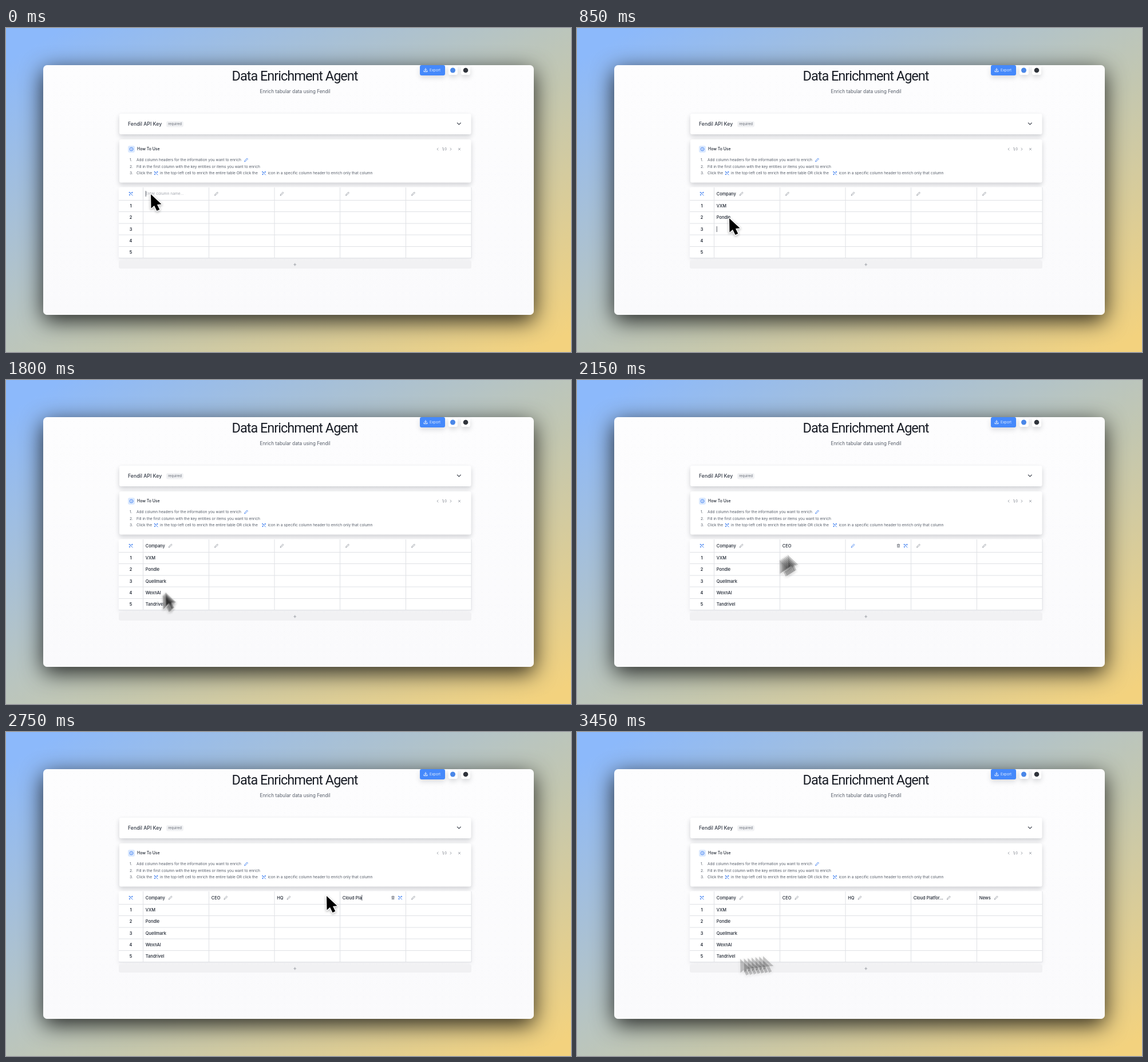
Recreate the animation shown at these times as an HTML page with a canvas. Size 987 by 567 pixels, loop 3.5 s.

```html
<!DOCTYPE html>
<html lang="en">
<head>
<meta charset="utf-8">
<title>Data Enrichment Agent</title>
<style>
html, body { margin: 0; width: 987px; height: 567px; overflow: hidden; }
body { position: relative; background: linear-gradient(to bottom right, #8cb9fb 5%, #bac5be 48%, #c3c7b0 58%, #f3d27e 97%); }
#page { position: absolute; left: 65px; top: 65px; width: 857px; height: 437px; border-radius: 7px;
  background: linear-gradient(#fdfdfe, #fafafc); box-shadow: 0 10px 38px rgba(0, 0, 0, .82); }
canvas { position: absolute; left: 0; top: 0; }
</style>
</head>
<body>
<div id="page"></div>
<canvas id="stage" width="987" height="567"></canvas>
<script>
const LOOP = 3500, STEP = 50;
const ctx = document.getElementById('stage').getContext('2d');
const BLUE = '#3b7df0', INK = '#1d2430', GREY = '#8d929b', BODY = '#555c68', LINE = '#dfe1e5';

const colX = [239.5, 354.5, 469, 583.5, 698.5];
const rowY = [311.5, 331.8, 352, 372.2, 392.4];
const ruleY = [301.5, 321.5, 342, 362, 382.5, 402.5];

// Column headers: edit opens, typing starts, typing ends, edit closes
const headers = [
  { label: 'Company', open: 0, from: 50, to: 300, close: 350 },
  { label: 'CEO', open: 1850, from: 1950, to: 2100, close: 2200 },
  { label: 'HQ', open: 2200, from: 2250, to: 2350, close: 2400 },
  { label: 'Cloud Platform', short: 'Cloud Platfor...', open: 2400, from: 2500, to: 2900, close: 2950 },
  { label: 'News', open: 2950, from: 3100, to: 3300, close: 3350 }
];
const hovers = [null, null, [2100, 2400], [2400, 2950], [2950, 3350]];

// First-column entries: name, typing starts, typing ends
const entries = [
  ['VXM', 350, 450], ['Pondle', 500, 750], ['Quellmark', 900, 1150],
  ['WexnAI', 1200, 1400], ['Tandrivel', 1450, 1750]
];

// Pointer path: time, x, y
const path = [
  [0, 253, 291], [350, 253, 291], [850, 266, 333], [1350, 264, 365], [1700, 266, 386],
  [1950, 298, 350], [2150, 368, 306], [2300, 440, 288], [2450, 524, 287], [2750, 560, 287],
  [2950, 610, 287], [3050, 645, 287], [3200, 706, 288], [3270, 725, 296], [3400, 335, 391],
  [3450, 285, 397], [3500, 256, 392]
];

function text(s, x, y, size, color = INK, weight = 400, align = 'left') {
  ctx.font = `${weight} ${size}px Inter, sans-serif`;
  ctx.fillStyle = color;
  ctx.textAlign = align;
  ctx.fillText(s, x, y + size * .36);
  return ctx.measureText(s).width;
}

function box(x, y, w, h, r, fill, shadow) {
  ctx.save();
  if (shadow) {
    ctx.shadowColor = `rgba(30, 35, 45, ${shadow})`;
    ctx.shadowBlur = 9;
    ctx.shadowOffsetY = 4;
  }
  ctx.fillStyle = fill;
  ctx.beginPath();
  ctx.roundRect(x, y, w, h, r);
  ctx.fill();
  ctx.restore();
}

function dot(x, y, r, fill) {
  ctx.fillStyle = fill;
  ctx.beginPath();
  ctx.arc(x, y, r, 0, 7);
  ctx.fill();
}

// Strokes an SVG path around (x, y)
function icon(d, x, y, color, width = 1) {
  ctx.save();
  ctx.translate(x, y);
  ctx.strokeStyle = color;
  ctx.lineWidth = width;
  ctx.lineCap = ctx.lineJoin = 'round';
  ctx.stroke(new Path2D(d));
  ctx.restore();
}

const pencil = (x, y, color) => icon('M-2.8 2.8L-2.2 .8L1.6 -2.8L2.9 -1.6L-.9 2.3Z', x, y, color, .8);
const sparkle = (x, y, color = BLUE) =>
  icon('M-1 -1L3 3M-1 -1L.4 -1.4M-2.9 -2.2H-1.9M-2.4 -2.8V-1.7M1.6 -2H3.2M2.4 -2.8V-1.2M-2.8 2H-1.2M-2 1.2V2.8', x, y, color);
const trash = (x, y) => icon('M-2.3 -1.8H2.3M-1 -1.8V-2.8H1V-1.8M-1.8 -1.8V2.8H1.8V-1.8M-.5 0V1.5M.5 0V1.5', x, y, '#737780', .8);

function drawPage() {
  ctx.fillStyle = 'rgba(120, 130, 150, .06)';
  for (let y = 72; y < 498; y += 11.5)
    for (let x = 72; x < 918; x += 11.5) ctx.fillRect(x, y, 1, 1);

  ctx.font = '400 23.5px Roboto, sans-serif';
  ctx.letterSpacing = '-1px';
  ctx.textAlign = 'center';
  ctx.fillStyle = '#191d26';
  ctx.fillText('Data Enrichment Agent', 504.5, 92);
  ctx.letterSpacing = '0px';
  text('Enrich tabular data using Fendil', 505, 111, 8.3, BODY, 400, 'center');

  box(723, 65, 44, 18, 3, '#4589fb', .15);
  icon('M0 -3V1M-1.8 -.7L0 1.1L1.8 -.7M-3 1.2V3H3V1.2', 733, 73.5, '#fff', .9);
  text('Export', 740, 73.5, 6.2, '#e4eeff');
  box(773, 66, 16, 16, 3, '#fff', .16);
  dot(780.5, 74, 4.5, '#4a87e8');
  box(795, 66, 16, 16, 3, '#fff', .16);
  dot(803, 74, 4.3, '#30343b');

  box(198, 150, 614.5, 36, 3, '#fff', .2);
  text('Fendil API Key', 213, 167.5, 8.7, '#343b47', 500);
  box(280, 163, 30, 10.5, 3, '#f1f2f4');
  text('required', 295, 168, 6, '#666b75', 400, 'center');
  icon('M-3 -1.5L0 1.5L3 -1.5', 791.3, 167.5, '#4a4f59', 1.1);

  box(198, 195, 614.5, 75.5, 3, '#fff', .2);
  box(213, 206, 12, 12, 3, '#dbe9fe');
  icon('M3 0A3 3 0 1 1 -3 0A3 3 0 1 1 3 0M0 0V1.3M0 -1.4V-1.3', 219, 212, BLUE, .8);
  text('How To Use', 229, 212, 6.9, INK, 500);
  icon('M1 -2L-1 0L1 2', 754, 212, GREY, .8);
  text('1/3', 765.7, 212, 5.8, '#747983', 400, 'center');
  icon('M-1 -2L1 0L-1 2', 777, 212, GREY, .8);
  icon('M-1.7 -1.7L1.7 1.7M1.7 -1.7L-1.7 1.7', 792, 212, GREY, .8);

  const small = (s, x, y) => text(s, x, y, 6.57, BODY);
  [230.8, 242.4, 254].forEach((y, i) => small(i + 1 + '.', 216, y));
  small('Add column headers for the information you want to enrich', 228, 230.8);
  pencil(419.5, 230.8, BLUE);
  small('Fill in the first column with the key entities or items you want to enrich', 228, 242.4);
  small('Click the', 228, 254);
  sparkle(262, 254);
  small('in the top-left cell to enrich the entire table OR click the', 269, 254);
  sparkle(450.5, 254);
  small('icon in a specific column header to enrich only that column', 457.5, 254);

  box(197, 278.5, 616, 124, 3, '#fff', .07);
  ctx.fillStyle = LINE;
  for (const y of ruleY) ctx.fillRect(197, y - .5, 616, 1);
  for (const x of [...colX, 813]) ctx.fillRect(x - .5, 279, 1, 123.5);
  sparkle(218, 290);
  rowY.forEach((y, i) => text(i + 1, 218, y, 7.2, INK, 600, 'center'));
  box(197, 407, 616, 14, 3, '#f1f1f3');
  icon('M-2 0H2M0 -2V2', 504.7, 414, GREY, .8);
}

function typed(s, from, to, t) {
  const share = Math.min(1, Math.max(0, (t - from) / (to - from)));
  return s.slice(0, Math.round(share * s.length));
}

function caret(x, y, t) {
  if (t % 800 >= 400) return;
  ctx.fillStyle = '#4b505a';
  ctx.fillRect(x, y - 5, .9, 10);
}

function drawHeaders(t) {
  headers.forEach((h, i) => {
    const x = colX[i] + 4.3, y = 290;
    const hover = hovers[i] && t >= hovers[i][0] && t < hovers[i][1];
    if (t < h.open) {
      pencil(colX[i] + 13, y, hover ? BLUE : GREY);
    } else if (t < h.close) {
      const s = typed(h.label, h.from, h.to, t);
      const w = s ? text(s, x, y, 7.4, INK, 500) : 0;
      if (!s) text('Enter column name...', x, y, 6.7, '#a3a7af');
      caret(x + w, y, t);
    } else {
      const w = text(h.short || h.label, x, y, 7.4, INK, 500);
      pencil(x + w + 9.5, y, GREY);
    }
    if (hover) {
      trash(colX[i] + 92.5, y);
      sparkle(colX[i] + 105, y);
    }
  });
}

function drawEntries(t) {
  let opened = 350;
  entries.forEach(([name, from, to], i) => {
    const w = text(typed(name, from, to, t), 243.8, rowY[i], 7.4, INK, 500);
    if (t >= opened && t < to) caret(243.8 + w, rowY[i], t);
    opened = to;
  });
}

function pointerAt(t) {
  t = Math.max(0, t);
  const i = Math.max(1, path.findIndex(p => p[0] >= t));
  const [a, b] = [path[i - 1], path[i]];
  const k = (t - a[0]) / (b[0] - a[0]);
  return [a[1] + (b[1] - a[1]) * k, a[2] + (b[2] - a[2]) * k];
}

const arrow = new Path2D('M0 0L.5 24.5L6 19.8L10.5 29L15.3 26.8L11 18L18.5 17.3Z');

function drawArrow([x, y], alpha) {
  ctx.save();
  ctx.translate(x, y);
  ctx.globalAlpha = alpha;
  ctx.lineJoin = 'round';
  ctx.lineWidth = 2.6;
  ctx.strokeStyle = '#fff';
  ctx.shadowColor = 'rgba(0, 0, 0, .35)';
  ctx.shadowBlur = 4;
  ctx.shadowOffsetY = 1.5;
  ctx.stroke(arrow);
  ctx.shadowColor = 'transparent';
  ctx.fillStyle = '#000';
  ctx.fill(arrow);
  ctx.restore();
}

// Fast moves leave a trail of translucent copies
function drawPointer(t) {
  const now = pointerAt(t), before = pointerAt(t - 40);
  if (Math.hypot(now[0] - before[0], now[1] - before[1]) < 5) return drawArrow(now, 1);
  for (let i = 0; i < 7; i++) drawArrow(pointerAt(t - 40 + i * 40 / 6), .2);
}

let shown = -1;
function frame(now) {
  const t = Math.floor(now % LOOP / STEP) * STEP;
  if (t !== shown) {
    shown = t;
    ctx.clearRect(0, 0, 987, 567);
    drawPage();
    drawHeaders(t);
    drawEntries(t);
    drawPointer(t);
  }
  requestAnimationFrame(frame);
}
requestAnimationFrame(frame);
</script>
</body>
</html>
```
